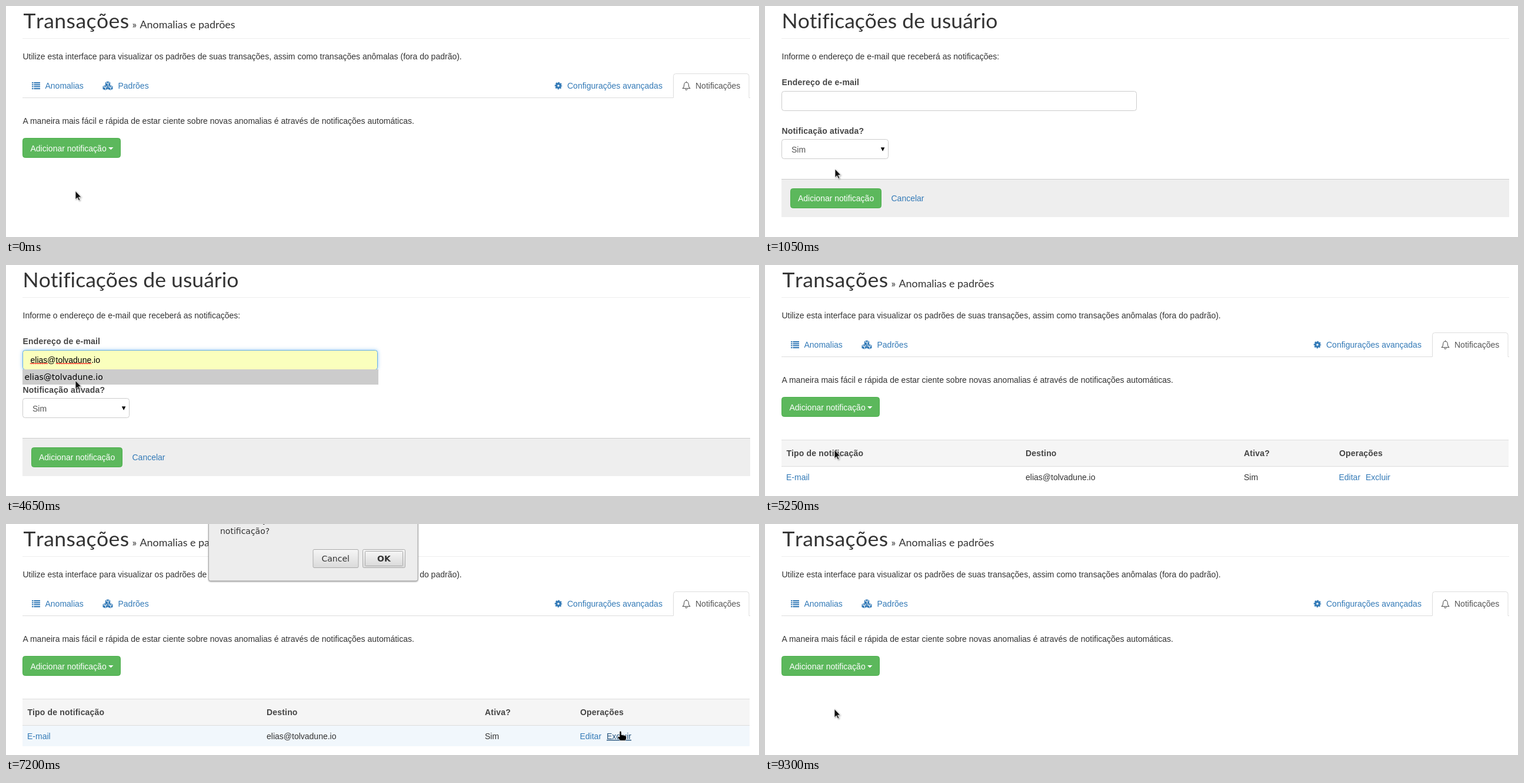
Animation of 1280 by 394 pixels, one loop 9.45 s. Source, as an HTML page:

```html
<!DOCTYPE html>
<html lang="pt">
<head>
<meta charset="utf-8">
<title>Notificações</title>
<style>
html, body { margin: 0; height: 100%; overflow: hidden; background: #fff; }
svg { display: block; width: 1280px; height: 394px; }
text { font: 14px "Liberation Sans", Arial, sans-serif; fill: #333; white-space: pre; }
.title { font: 35.6px Lato, sans-serif; font-kerning: none; font-variant-ligatures: none; }
.loose { letter-spacing: .4px; }
.sub { font: 17.9px Lato, sans-serif; }
.bold { font-weight: bold; fill: #444; letter-spacing: .18px; }
.system { font: 14px "DejaVu Sans", sans-serif; }
.link, .blue { fill: #337ab7; }
.grey { fill: #555; }
.white { fill: #fff; }
.button { fill: #5cb85c; stroke: #4cae4c; }
.button.on { fill: #449d44; stroke: #398439; }
.link.on { fill: #23527c; text-decoration: underline; }
.field { fill: #fff; stroke: #ccc; }
.field.focus { stroke: #66afe9; filter: drop-shadow(0 0 3px rgba(102, 175, 233, .65)); }
.field.filled { fill: #faffbd; }
.rule { stroke: #ddd; fill: none; }
.push { fill: url(#metal); stroke: #aaa; }
.wave { fill: none; stroke: #f00; }
#arrow { filter: drop-shadow(1px 1px 1px rgba(0, 0, 0, .35)); }
</style>
</head>
<body>
<svg viewBox="0 0 1280 394">
  <defs>
    <linearGradient id="metal" x2="0" y2="1">
      <stop stop-color="#f6f6f6"/><stop offset="1" stop-color="#dadada"/>
    </linearGradient>
    <g id="cube">
      <path class="blue" d="M0-4.2 4.2-2.5V2.3L0 4.2-4.2 2.3V-2.5Z"/>
      <path d="M-3-1.8 0-.5 3-1.8M.6.3V3" fill="none" stroke="#fff" stroke-width="1.2"/>
    </g>
  </defs>
  <path d="M28 55.5H1265" stroke="#eee"/>

  <g id="list">
    <text class="title loose" x="29.5" y="38">Transações</text>
    <text class="sub" x="214.5" y="38">»</text>
    <text class="sub" x="227.5" y="38">Anomalias e padrões</text>
    <text x="28.5" y="91">Utilize esta interface para visualizar os padrões de suas transações, assim como transações anômalas (fora do padrão).</text>

    <path class="rule" d="M28 156.5H1134.5V119.5a4 4 0 0 1 4-4H1259a4 4 0 0 1 4 4V156.5H1265"/>
    <path d="M44 131H58M44 134.3H58M44 137.6H58M44 140.9H58" stroke="#337ab7" stroke-width="2" stroke-dasharray="2.4 1 10.6 0"/>
    <text class="link" x="66.5" y="141">Anomalias</text>
    <use href="#cube" x="173" y="132.7"/>
    <use href="#cube" x="168.7" y="139.4"/>
    <use href="#cube" x="177.3" y="139.4"/>
    <text class="link" x="190.5" y="141">Padrões</text>
    <g fill="none" stroke="#337ab7">
      <circle cx="939" cy="136" r="3.4" stroke-width="3.2"/>
      <circle cx="939" cy="136" r="5.3" stroke-width="2" stroke-dasharray="2.4 1.763" stroke-dashoffset="1.2"/>
    </g>
    <text class="link" x="954" y="141">Configurações avançadas</text>
    <path d="M1150.5 140.5c2-2 2.3-4 2.3-6.5a3.7 3.7 0 0 1 7.4 0c0 2.5.3 4.5 2.3 6.5ZM1156.5 130v-1.5M1154.8 141.5a1.7 1.7 0 0 0 3.4 0" fill="none" stroke="#555" stroke-width="1.1"/>
    <text class="grey" x="1172" y="141">Notificações</text>

    <text x="28.5" y="201">A maneira mais fácil e rápida de estar ciente sobre novas anomalias é através de notificações automáticas.</text>
    <rect id="open" class="button" x="28.5" y="225.5" width="166" height="33" rx="4"/>
    <text class="white" x="41.5" y="247.5">Adicionar notificação</text>
    <path class="white" d="M174 241h8.5l-4.25 4.2Z"/>

    <g id="menu">
      <rect x="28.5" y="261.5" width="159" height="37" rx="4" fill="#fff" stroke="#ccc"/>
      <rect id="item" x="29" y="267" width="158" height="26" fill="#f5f5f5"/>
      <text x="49" y="285">E-mail</text>
    </g>

    <g id="table">
      <path d="M28 299H1264V343H28Z" fill="#f5f5f5"/>
      <path id="row" d="M28 344H1264V379H28Z" fill="#f1f7fc"/>
      <path class="rule" d="M28 298.5H1264M28 343.5H1264"/>
      <text class="bold" x="36.5" y="326">Tipo de notificação</text>
      <text class="bold" x="443" y="326">Destino</text>
      <text class="bold" x="814" y="326">Ativa?</text>
      <text class="bold" x="976" y="326">Operações</text>
      <text class="link" x="36" y="367">E-mail</text>
      <text class="address" x="443" y="367"></text>
      <text x="814" y="367">Sim</text>
      <text class="link" x="975.5" y="367">Editar</text>
      <text id="remove" class="link" x="1021" y="367">Excluir</text>
    </g>
  </g>

  <g id="form">
    <text class="title" x="28.5" y="38">Notificações de usuário</text>
    <text x="28.5" y="91">Informe o endereço de e-mail que receberá as notificações:</text>
    <text class="bold" x="28.5" y="135">Endereço de e-mail</text>
    <rect id="field" class="field" x="28.5" y="145.5" width="603" height="33" rx="4"/>
    <text id="typed" x="41.5" y="167"></text>
    <path id="userWave" class="wave"/>
    <path id="hostWave" class="wave"/>
    <text class="bold" x="28.5" y="218">Notificação ativada?</text>
    <rect class="field" x="28.5" y="227.5" width="181" height="33" rx="4"/>
    <text class="grey" x="45" y="249.5">Sim</text>
    <path d="M196.8 241.3h6.6l-3.3 6.5Z"/>
    <path d="M28 295H1265V360H28Z" fill="#eee"/>
    <path d="M28 295.5H1265" stroke="#ccc"/>
    <rect id="send" class="button" x="43.5" y="311.5" width="154" height="33" rx="4"/>
    <text class="white" x="56" y="333">Adicionar notificação</text>
    <text class="link" x="214.5" y="333">Cancelar</text>
    <g id="suggest">
      <rect id="choice" x="28.5" y="178.5" width="604" height="25"/>
      <text class="system address" x="31.5" y="196" style="fill:#000"></text>
    </g>
  </g>

  <g id="dialog">
    <path d="M344.5-5V94a3 3 0 0 0 3 3H697a3 3 0 0 0 3-3V-5Z" fill="#ededed" stroke="#aaa" style="filter:drop-shadow(0 1px 1px #0006)"/>
    <text class="system" x="434" y="-2">ç</text>
    <text class="system" x="364" y="17">notificação?</text>
    <rect class="push" x="522" y="43.5" width="77" height="31" rx="2"/>
    <rect class="push" x="606.5" y="43.5" width="72" height="31" rx="2"/>
    <rect class="push" x="610.5" y="46.5" width="64" height="25" rx="1"/>
    <text class="system" x="536.5" y="64">Cancel</text>
    <text class="system" x="631" y="64" style="font-weight:bold">OK</text>
  </g>

  <g id="pointer">
    <path id="arrow" d="M0 0V14.5L3.4 11.4 5.7 16.5 7.9 15.5 5.6 10.5H10Z" fill="#111" stroke="#fff" stroke-width=".8"/>
    <path id="beam" d="M-3-6.5H-1L0-5.5 1-6.5H3M0-5.5V5.5M-3 6.5H-1L0 5.5 1 6.5H3" fill="none" stroke="#222" stroke-width="1.2"/>
    <path id="hand" d="M-2-1q1.5-1.5 3 0V4.5L7 5.5Q9.5 6 9.5 8.5V11L8 14.5H-1L-5 9.5V7L-2 8Z" fill="#000" stroke="#fff" stroke-width=".7"/>
  </g>
</svg>
<script>
const STEP = 150, LOOP = 9450;
const address = "elias@tolvadune.io";
const $ = id => document.getElementById(id);
const show = (id, on) => { $(id).style.display = on ? "" : "none"; };
const mark = (id, name, on) => $(id).classList.toggle(name, on);

// keys: [time, ...values]
const path = [
  [0, 118, 315.5], [450, 118, 245], [600, 118, 245], [750, 119, 278], [1050, 119, 278],
  [1650, 121, 162], [4200, 121, 162], [4500, 118, 197], [4650, 118, 197], [4950, 118, 315.5],
  [5400, 118, 315.5], [6450, 1045, 355], [8250, 1045, 355], [9300, 118, 315.5]
];
const typing = [[1800, 0], [2700, 6], [3150, 12], [4200, 16]];
const smooth = u => u * u * (3 - 2 * u);

function track(keys, t, ease = u => u) {
  const i = keys.findIndex(k => k[0] > t);
  if (i < 0) return keys.at(-1).slice(1);
  if (i === 0) return keys[0].slice(1);
  const a = keys[i - 1], b = keys[i];
  const u = ease((t - a[0]) / (b[0] - a[0]));
  return a.slice(1).map((v, j) => v + (b[j + 1] - v) * u);
}

function wave(id, from, to) {
  $(id).setAttribute("d", `M${from} 169` + "l1.5-2 1.5 2".repeat((to - from) / 3));
}

function draw(t) {
  const between = (a, b) => t >= a && t < b;
  const [x, y] = track(path, t, smooth);
  const form = between(1050, 5250);
  const table = between(5250, 7350);
  const menu = between(600, 1050);
  const suggest = between(1950, 4800);
  const hover = suggest && y > 178;
  const filled = hover || between(4800, 5250);
  const count = Math.floor(track(typing, t)[0] + 0.01);
  const beam = form && y > 145 && y < 178;
  const remove = table && x > 1021 && y > 350;

  show("list", !form);
  show("form", form);
  show("menu", menu);
  show("item", y > 267);
  show("table", table);
  show("row", y > 343);
  show("suggest", suggest);
  show("dialog", between(7200, 7350));
  show("userWave", filled || count >= 6);
  show("hostWave", filled || count >= 16);
  show("beam", beam);
  show("hand", remove);
  show("arrow", !beam && !remove);

  mark("open", "on", menu || (y > 225 && y < 259));
  mark("send", "on", y > 311);
  mark("remove", "on", remove);
  mark("field", "focus", t >= 1800);
  mark("field", "filled", filled);

  $("typed").textContent = filled ? address : address.slice(0, count);
  $("typed").style.fill = filled ? "#000" : "#555";
  $("choice").setAttribute("fill", hover ? "#ccc" : "#fff");
  $("choice").setAttribute("stroke", hover ? "#ccc" : "#bbb");
  $("pointer").setAttribute("transform", `translate(${x} ${y})`);
}

document.querySelectorAll(".address").forEach(e => { e.textContent = address; });
wave("userWave", 41, 71);
wave("hostWave", 85, 145);

const start = performance.now();
function frame() {
  const t = (performance.now() - start) % LOOP;
  draw(Math.floor(t / STEP) * STEP);
  requestAnimationFrame(frame);
}
frame();
</script>
</body>
</html>
```
